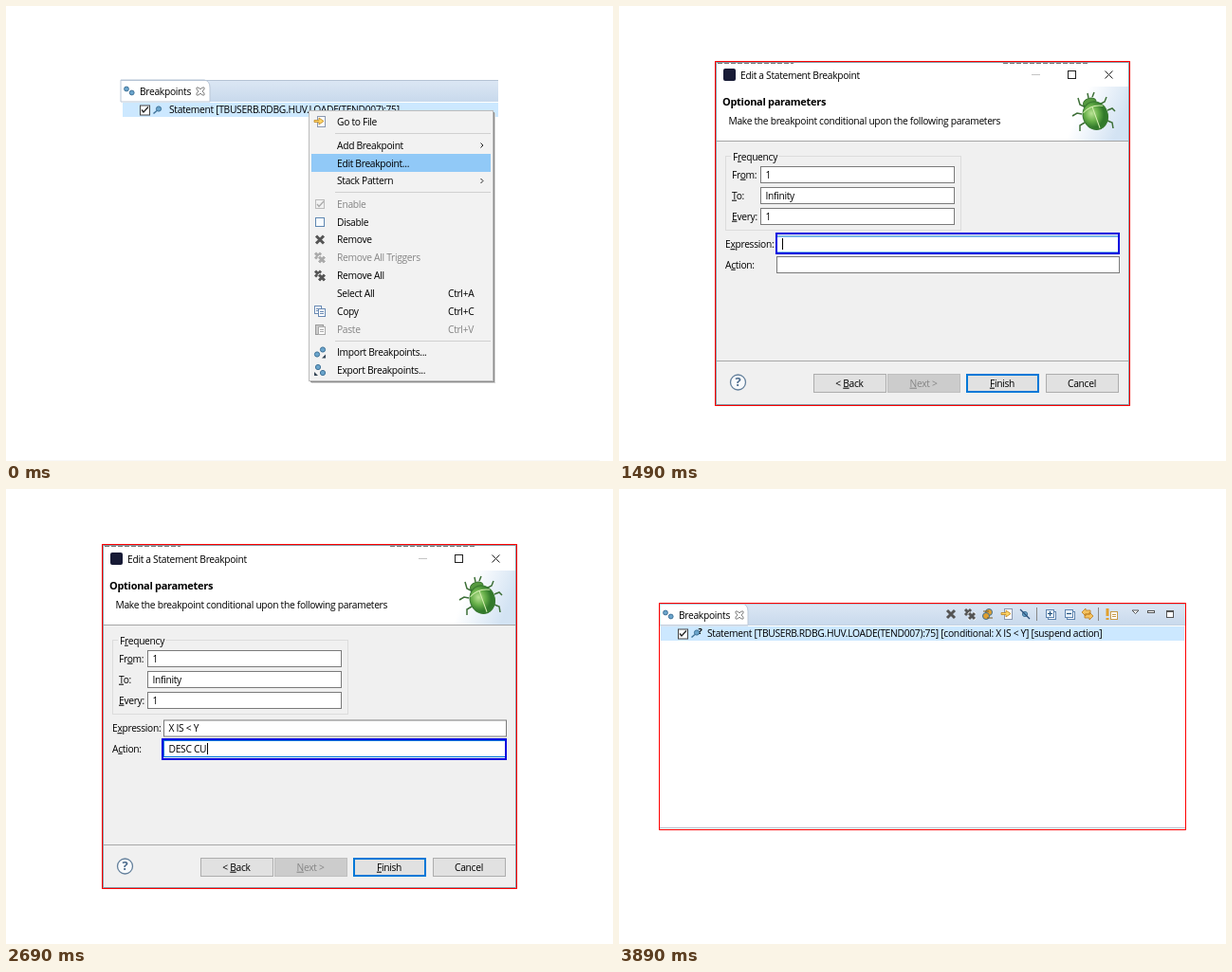
An HTML page that plays this animation: 640x480 px, repeating every 4.13 s.

```html
<!DOCTYPE html>
<html lang="en">
<head>
<meta charset="utf-8">
<title>Edit a breakpoint</title>
<style>
html, body { margin: 0; width: 100%; height: 100%; overflow: hidden; background: #fff; }
svg { display: block; width: 640px; height: 480px; }
text { font: 10.25px "Open Sans", "Noto Sans", sans-serif; letter-spacing: -.3px; }
.head { font-size: 11px; font-weight: 700; }
.mid { text-anchor: middle; }
.off { fill: #858585; }
.u { text-decoration: underline; }
</style>
</head>
<body>
<svg id="stage" viewBox="0 0 640 480">
  <defs>
    <linearGradient id="bar" x2="0" y2="1"><stop stop-color="#dce7f4"/><stop offset="1" stop-color="#c8d9ec"/></linearGradient>
    <linearGradient id="banner" x2="1" y2=".35"><stop offset=".35" stop-color="#fff"/><stop offset="1" stop-color="#d3e3f3"/></linearGradient>
    <radialGradient id="shell" cx=".38" cy=".38"><stop stop-color="#b9e294"/><stop offset=".55" stop-color="#68b04a"/><stop offset="1" stop-color="#327a2b"/></radialGradient>
  </defs>
</svg>
<script>
const LOOP = 4130, FIRST = 530, STEP = 600;
const ROW = 'Statement [TBUSERB.RDBG.HUV.LOADE(TEND007):75]';
const INK = '#555', STEEL = '#3f7298', GOLD = '#e0a030';

const escape = s => s.replace(/</g, '&lt;').replace(/>/g, '&gt;');
// y is the middle of the capitals; "_" underlines the next letter
const text = (x, y, s, cls = '', extra = '') => `<text x="${x}" y="${y + 3.7}" class="${cls}" ${extra}>` +
  escape(s).replace(/_(.)/g, '<tspan class="u">$1</tspan>') + '</text>';
const fill = (x, y, w, h, color) => `<rect x="${x}" y="${y}" width="${w}" height="${h}" fill="${color}"/>`;
// x, y, w, h are the outer edges, the line lies inside
const box = (x, y, w, h, stroke, color = 'none', line = 1) =>
  `<rect x="${x + line / 2}" y="${y + line / 2}" width="${w - line}" height="${h - line}" fill="${color}" stroke="${stroke}" stroke-width="${line}"/>`;
const path = (d, stroke, width = 1, color = 'none', extra = '') =>
  `<path d="${d}" fill="${color}" stroke="${stroke}" stroke-width="${width}" ${extra}/>`;
const dot = (x, y, r, color = '#6ba5cc') =>
  `<circle cx="${x}" cy="${y}" r="${r}" fill="${color}" stroke="${STEEL}"/>`;
const at = (x, y, s) => `<g transform="translate(${x} ${y})">${s}</g>`;

// icons, drawn around 0,0
const dots = dot(-3, -2, 2.4) + dot(2.7, 2, 2.4);
const cross = (color = INK, r = 4) => path(`M${-r} ${-r}L${r} ${r}M${r} ${-r}L${-r} ${r}`, color, 3);
const crosses = color => at(-2, -2, cross(color, 3)) + at(2, 2, cross('#fff', 3.6) + cross(color, 3));
const closeTab = path('M-4-4h2l2 2 2-2h2v2l-2 2 2 2v2h-2l-2-2-2 2h-2v-2l2-2-2-2z', '#777', .9, '#fff');
const tick = color => path('M-3 0L-1 2.5 4-3', color, 1.3);
const marker = path('M-4.5 4L-1 1', STEEL, 1.5) + dot(1, -1, 2.6);
const sheet = (x, y, color) => box(x, y, 8, 9, color, '#fff') + path(`M${x + 2} ${y + 3.5}h4m-4 2h4`, color);
const gotoFile = box(-3, -6, 9, 12, '#8a98b0', '#fff') + path('M-6-1.5h5v-2.5l5 3.5-5 3.5v-2.5h-5z', '#bd8520', .8, '#ffd668');
const copy = sheet(-6, -6, '#6889b3') + sheet(-2, -3, '#6889b3');
const paste = box(-5, -5, 9, 11, '#999', '#ccc') + sheet(-2, -3, '#aaa');
const swap = path('M-6-2l4-4v2h5v4h-5v2zM6 2l-4 4v-2h-5v-4h5v-2z', '#bb7d20', .8, '#f4c361');

const tab = (x, y, w, right) =>
  fill(x, y, right - x, 23, 'url(#bar)') +
  path(`M${x} ${y + 23}V${y}H${x + w - 7}q6 1 6 8V${y + 23}z`, '#b9c6d6', 1, '#fff') +
  path(`M${x} ${y + .5}H${right}`, '#b5c3d4') +
  at(x + 9, y + 11.5, dots) + text(x + 20, y + 12, 'Breakpoints') + at(x + 84, y + 12, closeTab);
const row = (x, y, s, extra) =>
  box(x, y - 5, 11, 11, '#444', '#fff') + at(x + 5, y, tick('#222')) +
  at(x + 19, y, marker) + text(x + 31, y, s, '', extra);

function menuScene() {
  const items = [
    [122, 'Go to File', gotoFile], [147, 'Add Breakpoint', '', '>'], [166, 'Edit Breakpoint...'],
    [184.5, 'Stack Pattern', '', '>'],
    [209, 'Enable', box(-5, -5, 10, 10, '#bbb') + tick('#aaa'), '', 'off'],
    [228, 'Disable', box(-5, -5, 10, 10, '#5f87b2', '#f7fbff')],
    [246.5, 'Remove', cross()], [265.5, 'Remove All Triggers', crosses('#aaa'), '', 'off'],
    [284.5, 'Remove All', crosses(INK)], [303, 'Select All', '', 'Ctrl+A'], [322, 'Copy', copy, 'Ctrl+C'],
    [341, 'Paste', paste, 'Ctrl+V', 'off'],
    [365.5, 'Import Breakpoints...', dot(-3, 2, 2.6) + dot(3, -3, 2.6) + path('M2 6l4-4v4z', 'none', 0, '#345')],
    [384, 'Export Breakpoints...', dot(-2, -3, 2.6) + dot(3, 3, 2.6) + path('M-6 6v-4l4 4z', 'none', 0, '#345')]
  ];
  return fill(13, 479, 613, 1, '#f8f8f8') + tab(121, 78, 95, 519) +
    fill(123, 102, 396, 15, '#cce8ff') + row(141, 109.5, ROW) +
    fill(322, 113, 194, 285, '#d2d2d2') + fill(321, 112, 194, 285, '#8c8c8c') +
    box(319, 110, 195, 286, '#bcbcbc', '#f2f2f2') + fill(322, 156, 189, 19, '#91c9f7') +
    [134, 196, 353].map(y => fill(347, y, 164, 1, '#d0d0d0')).join('') +
    items.map(([y, label, icon = '', side = '', cls = '']) =>
      text(349, y, label, cls) + at(331, y, icon) +
      (side === '>' ? path(`M500.5 ${y - 2.5}l2.5 2.5-2.5 2.5`, '#222') : text(466, y, side, cls))).join('');
}

const bug = path('M492 107l-6-3-2-7M488 114l-5-1-5 3M491 123l-5 3 0 6M508 103l4-2 2-5M515 110l5-2 3 3M515 121l5 2 1 6M495 97l-1-5m5 4l2-5', '#3d6f37', 1.5) +
  '<g transform="rotate(-20 501 115)">' +
  '<ellipse cx="501" cy="101" rx="7" ry="4.500" fill="#569a40" stroke="#35702c"/>' +
  '<ellipse cx="502" cy="116" rx="13" ry="15" fill="url(#shell)" stroke="#37782f"/>' +
  path('M491 109q11-6 22 0M502 106v24', '#d6efb2') + '</g>';

const button = (x, y, label, kind) => {
  const [color, edge, line] = {
    off: ['#ccc', '#bfbfbf', 1], main: ['#e1e1e1', '#0078d7', 2], hot: ['#e5f1fb', '#0078d7', 1]
  }[kind] || ['#e1e1e1', '#adadad', 1];
  return box(x, y - 10, 77, 20, edge, color, line) + text(x + 38, y, label, 'mid ' + (kind === 'off' ? 'off' : ''));
};
const ring = (x, y, w, h) => box(x, y, w, h, '#0000e0', 'none', 2);
const input = (x, y, w, value = '', edge = '#7a7a7a') => box(x, y - 9, w, 18, edge, '#fff') + text(x + 5.5, y, value);
const caret = (x, y) => fill(x, y - 6, 1, 12, '#000');

// window frame, header and footer shared by both wizard pages
function dialog({ dx = 0, dy = 0, foot = 0, shift = 0, title, hint, red, next, body }) {
  const y = 398 + foot;
  const frame = red
    ? box(102, 59, 436, 362, '#8a98a3', '#f0f0f0') + fill(103, 60, 434, 83 + dy, '#fff') +
      path('M104 60.5h80M405 60.5h90', '#777', 1, 'none', 'stroke-dasharray="5 2"')
    : fill(103, 57, 436, 366, '#dcdfe3') + fill(187, 57, 352, 37, '#c9d9e9') +
      box(102, 58, 435, 363, '#606060', '#f0f0f0') + fill(103, 59, 433, 83, '#fff');
  return frame + fill(468, 85 + dy, red ? 69 : 68, 57, 'url(#banner)') +
    fill(103, 142 + dy, 434, 1, '#a5a5a5') + fill(103, 374 + foot, 434, 1, '#a8a8a8') +
    `<rect x="${110 + dx}" y="${66 + dy}" width="13" height="13" rx="2" fill="#171a35"/>` +
    text(128 + dx, 73 + dy, 'Edit a Statement Breakpoint') +
    at(dx + shift, dy, path('M435 72.5h9', '#c4c4c4') + box(473, 68, 9, 9, '#222') + path('M512.5 68.5l8 8m0-8l-8 8', '#222') + bug) +
    text(109 + dx, 101 + dy, title, 'head') + text(115.5 + dx, 121 + dy, hint) +
    body +
    `<circle cx="${125.5 + dx}" cy="${y - 1}" r="8" fill="#f8fafc" stroke="#64809c" stroke-width="1.3"/>` +
    text(125.5 + dx, y - 1, '?', 'mid head', 'style="font-size:13px;fill:#49698b"') +
    at(dx + shift, 0, button(205, y, '< _Back', next === 'hot' ? 'off' : '') + button(283, y, '_Next >', next) +
      button(366, y, '_Finish', 'main') + button(450, y, 'Cancel'));
}

function requiredScene() {
  const combo = (y, label, value) => text(111, y, label) + box(111, y + 10, 416, 20, '#7a7a7a', '#fff') +
    text(116.5, y + 19.5, value) + path(`M516 ${y + 18.5}l3 3 3-3`, '#555');
  const body = box(111, 152, 11, 11, '#333', '#fff') + text(125, 158, '_Defer breakpoint until executable is loaded') +
    '<rect x="124.5" y="152.5" width="192" height="12" fill="none" stroke="#333" stroke-dasharray="1 1"/>' +
    combo(176, 'Load Module/DLL/Executable', 'TEND007') + combo(217, 'Object/Program/CSECT', 'TEND007') +
    combo(258, '_Source(optional):', 'TEND007.TEND007') +
    text(111, 298.5, '_Statement:') + input(111, 318, 96, '75') +
    text(111, 338, '_User label (optional):') + input(111, 357, 416);
  return dialog({ dx: -1, dy: -1, title: 'Required information', next: 'hot', body,
    hint: 'Sets a breakpoint to stop execution at a specific source line' }) + ring(280, 385, 78, 25);
}

function optionalScene({ dy = 0, foot = 0, shift = 0, expr = '', action = '', active, caretX }) {
  const line = (y, label, value) => text(119, y, label) + input(149 + shift, y, 205, value);
  const edge = name => active === name ? '#0078d7' : '#7a7a7a';
  const group = box(112, 158, 249, 79, '#dcdcdc') + fill(118, 156, 50, 5, '#f0f0f0') + text(120, 159, 'F_requency') +
    line(178, 'Fr_om:', '1') + line(200, '_To:', 'Infinity') + line(222, '_Every:', '1') +
    text(112, 251.5, 'E_xpression:') + input(166, 251.5, 362, expr, edge('expr')) +
    text(112, 273, 'A_ction:') + input(166 + shift, 273, 362, action, active === 'finish' ? '#222' : edge('action')) +
    (active === 'expr' ? ring(165, 239, 363, 23) + caret(caretX, 251) : caret(caretX, 273)) +
    (active === 'action' ? ring(164, 262, 364, 23) : '');
  const outline = shift
    ? path('M537.5 58V421.5H102', '#777') + path('M102.5 422V58.5H538', '#f00')
    : box(101, 58, 438, 364, '#f00');
  return dialog({ dy, foot, shift, red: true, title: 'Optional parameters', next: 'off', body: at(0, dy, group),
    hint: 'Make the breakpoint conditional upon the following parameters' }) + outline +
    (active === 'finish' ? ring(366, 387, 78, 25) : '');
}

function resultScene() {
  const square = sign => box(-3, -3, 9, 9, '#5d83ae', '#fff') + box(-5, -5, 9, 9, '#5d83ae', '#e9f2fb') + path(sign, '#24527d', 1.2);
  const tools = [
    [350, cross()], [370, crosses(INK)],
    [389, dot(1, -2, 3.5, GOLD) + dot(-2, 2, 3.5, GOLD) + path('M-5-3h6m-2 7h6', '#7a5a20')],
    [409, gotoFile], [428, dot(0, 0, 2.6) + path('M-5-5L5 5', '#284f7a', 1.3)],
    [440, path('M.5-7V7', '#888')], [455, square('M-3-.5h5M-.5-3v5')], [475, square('M-3-.5h5')],
    [494, swap], [505, path('M.5-7V7', '#888')],
    [520, path('M-5-6v8m0 2v2', GOLD, 3) + sheet(-2, -3, '#c99b45')],
    [545, path('M-4-4h7l-3.5 3.5z', '#555', 1, '#fff')],
    [561, box(-4, -4, 8, 3, '#555', '#fff')], [581, box(-4, -4, 8, 8, '#555', '#fff') + fill(-4, -4, 8, 2, '#555')]
  ];
  return tab(43, 121, 94, 597) + fill(43, 143, 554, 1, '#c3d1e1') +
    tools.map(([x, icon]) => at(x, 132, icon)).join('') +
    fill(44, 145, 552, 15, '#cce8ff') +
    row(62, 152.5, ROW + ' [conditional: X IS < Y] [suspend action]', 'style="font-size:10.3px"') +
    text(83.5, 149.5, '?', 'head', 'style="font-size:9px"') +
    fill(43, 357, 554, 1, '#b5c0d0') + box(42, 120, 556, 240, '#f00');
}

const expr = 'X IS < Y', action = 'DESC CU';
const scenes = [
  menuScene(),
  requiredScene(),
  optionalScene({ active: 'expr', caretX: 172 }),
  optionalScene({ dy: -1, shift: 1, expr, active: 'expr', caretX: 206 }),
  optionalScene({ dy: 1, foot: 1, expr, action, active: 'action', caretX: 212 }),
  optionalScene({ dy: 1, foot: 1, expr, action, active: 'finish', caretX: 212 }),
  resultScene()
];
const stage = document.getElementById('stage');
stage.insertAdjacentHTML('beforeend', scenes.map(s => `<g class="scene">${s}</g>`).join(''));
const layers = [...stage.querySelectorAll('.scene')];

function draw() {
  const t = performance.now() % LOOP;
  const current = t < FIRST ? 0 : 1 + Math.floor((t - FIRST) / STEP);
  layers.forEach((layer, i) => layer.style.display = i === current ? '' : 'none');
  requestAnimationFrame(draw);
}
draw();
</script>
</body>
</html>
```
